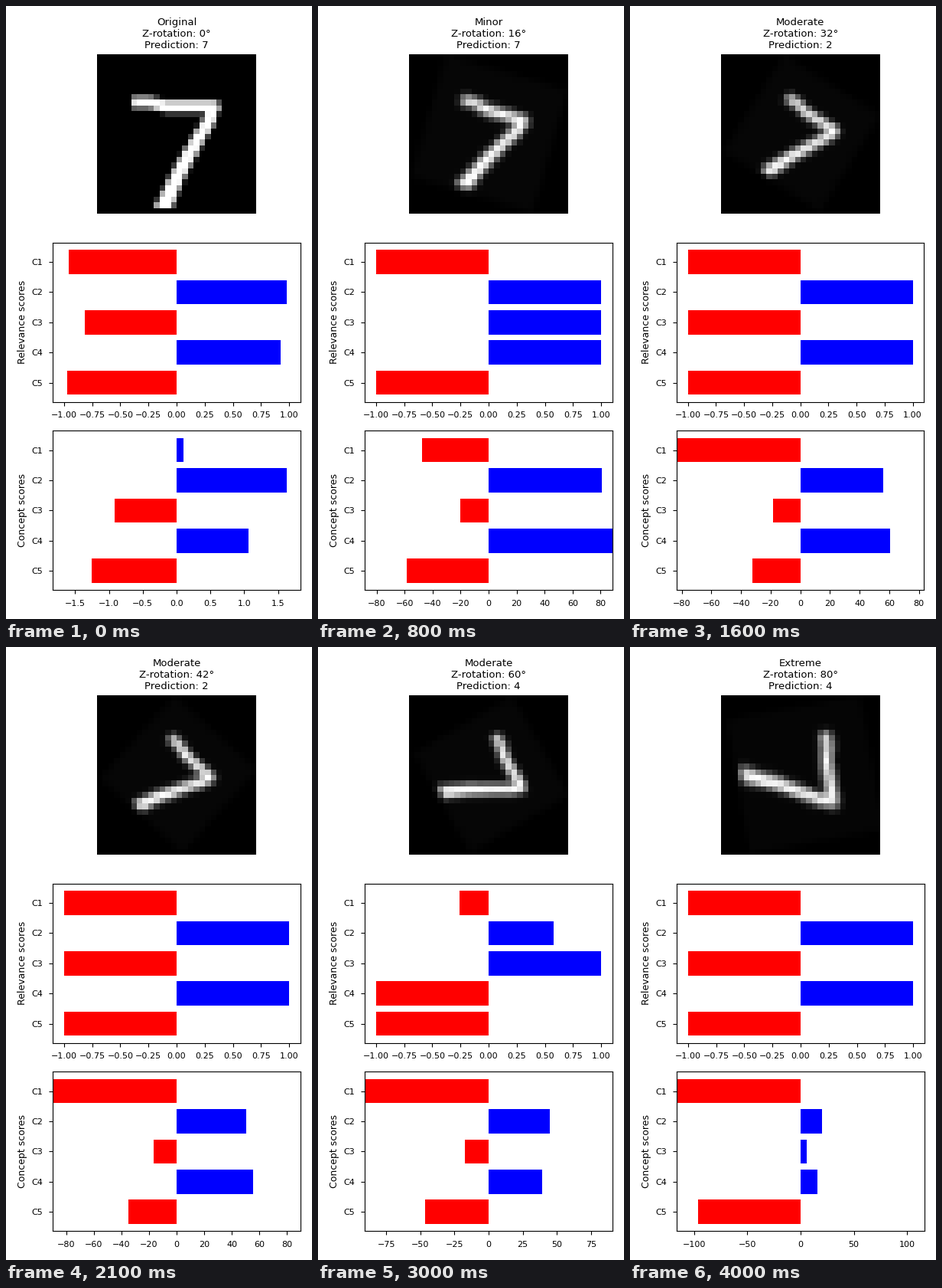
Animation of 400x800 px, one loop 4.1 s. Source, as a matplotlib script:

```python
import numpy as np
import matplotlib.pyplot as plt
from matplotlib.animation import FuncAnimation

FRAMES = 41
STEP_MS = 100
DEG_PER_FRAME = 2
SIZE = 28
BACKGROUND = 0.022
NAMES = [f"C{k}" for k in range(1, 6)]

# Centre line of the digit in pixel coordinates: x, y, half width
BAR = [(5, 7.9, 0.95), (9, 8.0, 0.95), (11.5, 8.7, 1.0), (20.2, 8.75, 1.0)]
STEM = [(19.9, 9, 1.0), (19.3, 11, 1.05), (17.5, 14, 1.07),
        (14.1, 20, 1.2), (10.9, 27, 1.4)]

# The upright digit has its own scores; the turned ones follow key points
REL_UPRIGHT = (-0.96, 0.98, -0.817, 0.925, -0.973)
SEVEN = (-1, 1, 1, 1, -1)
SETTLED = (-1, 1, -1, 1, -1)
REL_KEYS = {12: SEVEN, 14: SETTLED, 28: SETTLED,
            30: (-0.26, 0.578, 1, -1, -1),
            33: (-1, 1, -1, 0.843, -1), 35: SETTLED}

CON_UPRIGHT = (0.1, 1.631, -0.92, 1.065, -1.25)
CON_KEYS = {8: (-47.6, 80.8, -20.2, 88.3, -58.5),
            16: (-83.2, 55.7, -18.5, 60.4, -32.4),
            25: (-94.7, 46.3, -15.2, 51.6, -36.9),
            30: (-90.5, 44.8, -17.3, 39.2, -46.4),
            33: (-97, 40.8, -4.2, 40.2, -53.4),
            40: (-116.1, 20.1, 5.7, 15.8, -96.2)}


def stroke(x, y, path):
    inside = np.zeros(x.shape, bool)
    for (x0, y0, r0), (x1, y1, r1) in zip(path, path[1:]):
        dx, dy = x1 - x0, y1 - y0
        t = np.clip(((x - x0) * dx + (y - y0) * dy) / (dx * dx + dy * dy), 0, 1)
        dist = np.hypot(x - x0 - t * dx, y - y0 - t * dy)
        inside |= dist < r0 + t * (r1 - r0)
    return inside


def make_digit(sub=10):
    pos = (np.arange(SIZE * sub) + 0.5) / sub - 0.5
    x, y = np.meshgrid(pos, pos)
    ink = (stroke(x, y, BAR) | stroke(x, y, STEM)) & (x > 5.55) & (y < 26.5)
    return ink.reshape(SIZE, sub, SIZE, sub).mean(axis=(1, 3))


def bilinear(img, x, y):
    img = np.pad(img, 2)
    x = np.clip(x + 2, 0, SIZE + 2.99)
    y = np.clip(y + 2, 0, SIZE + 2.99)
    i, j = y.astype(int), x.astype(int)
    v, u = y - i, x - j
    return ((img[i, j] * (1 - u) + img[i, j + 1] * u) * (1 - v)
            + (img[i + 1, j] * (1 - u) + img[i + 1, j + 1] * u) * v)


def rotate(img, degrees):
    """Turn clockwise on a grown canvas, then shrink back to SIZE."""
    if degrees == 0:
        return img
    a = np.radians(degrees)
    c, s = np.cos(a), np.sin(a)
    n = int(np.ceil(SIZE * (c + s)))
    # The pivot is pixel n / 2, so the digit drifts slightly as it turns
    pos = np.arange(n) - n / 2
    x, y = np.meshgrid(pos, pos)
    mid = SIZE / 2
    tinted = BACKGROUND + (1 - BACKGROUND) * img
    turned = bilinear(tinted, c * x + s * y + mid, c * y - s * x + mid)

    ratio = n / SIZE
    centres = (np.arange(SIZE) + 0.5) * ratio
    weights = 1 - np.abs(np.arange(n) + 0.5 - centres[:, None]) / ratio
    weights = np.maximum(weights, 0)
    weights /= weights.sum(axis=1, keepdims=True)
    small = weights @ turned @ weights.T
    return small / small.max()


def scores(i, upright, keys):
    if i == 0:
        return np.array(upright)
    return np.array([np.interp(i, list(keys), col) for col in zip(*keys.values())])


def title(i):
    deg = i * DEG_PER_FRAME
    if deg == 0:
        level = "Original"
    elif deg <= 30:
        level = "Minor"
    else:
        level = "Moderate" if deg <= 60 else "Extreme"
    guess = 7 if i < 14 else 2 if i < 29 else 4
    return f"{level}\nZ-rotation: {deg}°\nPrediction: {guess}"


def draw_bars(ax, values, limit, label):
    ax.clear()
    ax.barh(NAMES, values, color=np.where(values < 0, "red", "blue"))
    ax.invert_yaxis()
    ax.set_xlim(-limit, limit)
    ax.set_ylabel(label, fontsize=9)
    ax.tick_params(labelsize=8, pad=5.6)


def update(i):
    ax_img.clear()
    ax_img.imshow(rotate(digit, i * DEG_PER_FRAME), cmap="gray", vmin=0, vmax=1)
    ax_img.set_title(title(i), fontsize=9.5)
    ax_img.axis("off")
    concept = scores(i, CON_UPRIGHT, CON_KEYS)
    draw_bars(ax_rel, scores(i, REL_UPRIGHT, REL_KEYS), 1.1, "Relevance scores")
    draw_bars(ax_con, concept, np.abs(concept).max() + 0.2, "Concept scores")
    fig.subplots_adjust(0.125, 0.11, 0.9, 0.88, hspace=0.2)
    fig.tight_layout()


digit = make_digit()
fig, (ax_img, ax_rel, ax_con) = plt.subplots(3, 1, figsize=(4, 8), dpi=100)
anim = FuncAnimation(fig, update, frames=FRAMES, interval=STEP_MS,
                     init_func=lambda: None, repeat=True, repeat_delay=0)
plt.show()
```
